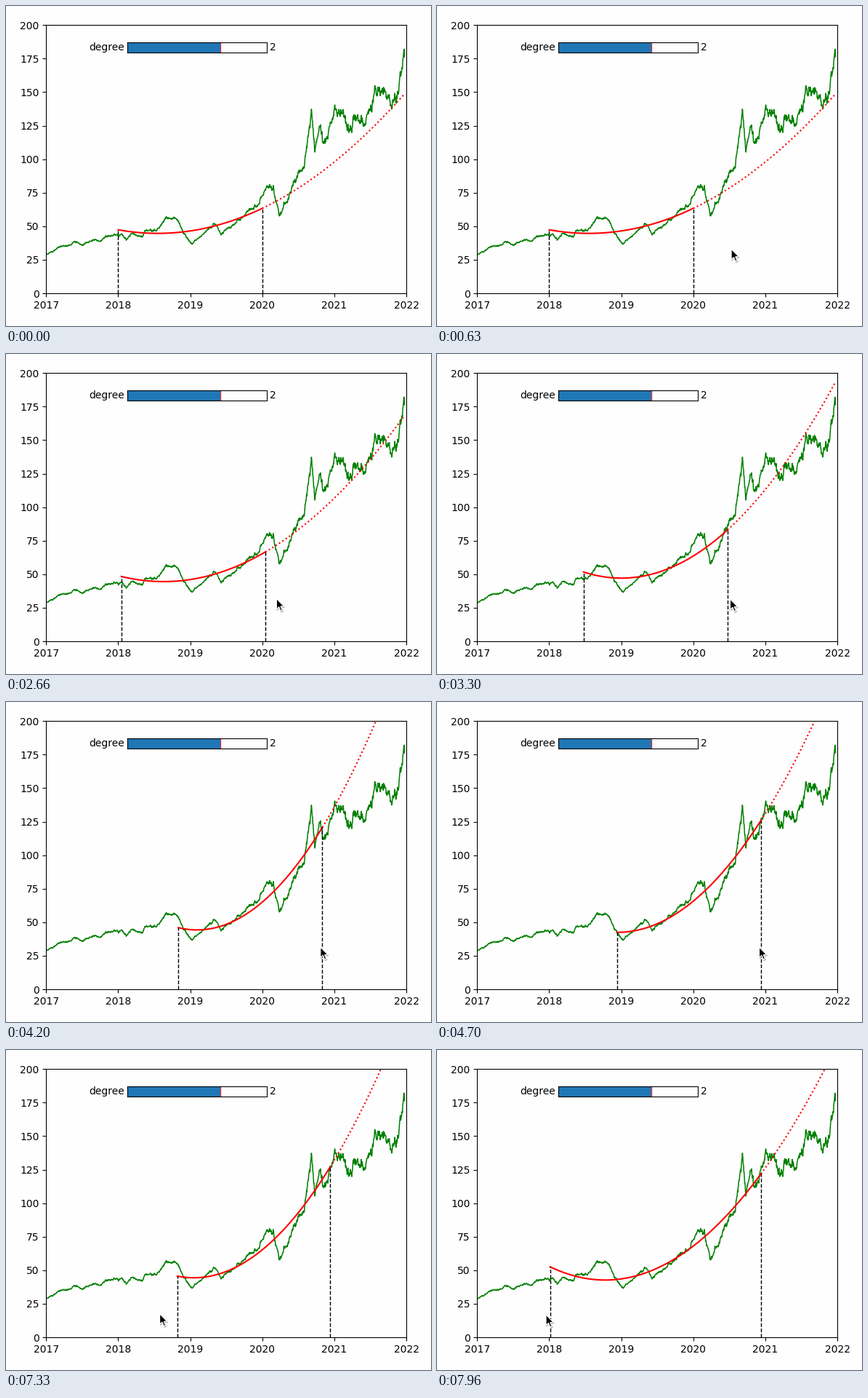
Write a matplotlib script that moves like this. It is 585 px wide and 440 px high and loops after 8 s.

```python
import numpy as np
import matplotlib.pyplot as plt
from matplotlib.animation import FuncAnimation
from matplotlib.patches import Polygon

W, H, DPI = 585, 440, 100
INTERVAL, LOOP = 40, 8000
START = 2017
PAPER = "#fefefe"

plt.rcParams.update({"font.family": "DejaVu Sans", "font.size": 10})

# Main turning points of the price: years after START, value
TURNS = [
    (.01, 29), (.17, 34.5), (.34, 36), (.4, 39), (.49, 36.2), (.68, 40.5),
    (.75, 38.5), (.86, 43.3), (1.05, 44), (1.11, 40), (1.19, 44.5),
    (1.33, 42), (1.38, 46.8), (1.54, 47.2), (1.66, 56), (1.78, 56.5),
    (1.84, 54), (1.91, 45), (2.02, 37), (2.15, 43.3), (2.34, 52),
    (2.43, 44.5), (2.6, 51), (2.85, 63), (2.95, 67), (3.06, 79), (3.15, 80),
    (3.235, 58), (3.45, 83), (3.59, 96), (3.683, 136), (3.73, 106),
    (3.79, 124), (3.85, 110), (4.005, 135), (4.08, 140), (4.2, 121),
    (4.305, 134), (4.4, 124), (4.55, 147), (4.695, 155), (4.775, 140),
    (4.89, 150), (4.972, 179),
]


def price_series():
    """Trend through the turning points with daily, quickly fading shocks."""
    t = np.linspace(TURNS[0][0], TURNS[-1][0], 1250)
    shocks = np.random.default_rng(7).normal(size=t.size)
    noise = np.convolve(shocks, .7 ** np.arange(20))[:t.size]
    volatility = np.where(t < 3.1, .008, .013)
    return t, np.interp(t, *zip(*TURNS)) * (1 + volatility * noise)


days, price = price_series()


def progress(t, begin, finish):
    return np.clip((t - begin) / (finish - begin), 0, 1)


def smooth(u):
    return u * u * (3 - 2 * u)


def ease_out(u, power=1.7):
    return 1 - (1 - u) ** power


def window(t):
    """Edges of the fitted span: first slid as a whole, then widened leftwards."""
    slide = (.648 * smooth(progress(t, 2460, 3730))
             + .292 * ease_out(progress(t, 3900, 4700), 2))
    widen = .927 * smooth(progress(t, 7160, 7960))
    return 1 + slide - widen, 2.998 + slide


# Pointer moves: begin, finish, x, y
ENTRY_TIME, ENTRY = 200, (581, 309)
MOVES = [
    (200, 730, 392, 336),
    (960, 1400, 354, 336),
    (2460, 3300, 403.5, 337),
    (3300, 3730, 418, 337),
    (3900, 4700, 443.5, 337),
    (5500, 5860, 255.5, 358.5),
    (6030, 6500, 245, 362),
    (7160, 7960, 150, 364),
]


def pointer(t):
    pos = np.array(ENTRY, float)
    for begin, finish, *goal in MOVES:
        pos += (goal - pos) * ease_out(progress(t, begin, finish))
    return pos


def add_axes(left, top, right, bottom, **kw):
    return fig.add_axes([left / W, 1 - bottom / H, (right - left) / W,
                         (bottom - top) / H], facecolor=PAPER, **kw)


fig = plt.figure(figsize=(W / DPI, H / DPI), dpi=DPI, facecolor=PAPER)

ax = add_axes(55.3, 26.3, 551.2, 395)
ax.set(xlim=(START, START + 5), ylim=(0, 200),
       xticks=range(START, START + 6), yticks=range(0, 201, 25))
ax.plot(START + days, price, color="green", lw=1.1)
solid, = ax.plot([], [], "r-", lw=1.5)
dotted, = ax.plot([], [], "r:", lw=1.5)
stems = [ax.plot([], [], "k--", lw=1)[0] for _ in range(2)]

slider = add_axes(167.3, 50.3, 359.3, 64.3)
slider.set(xlim=(0, 3), ylim=(0, 1), xticks=[], yticks=[])
slider.axvspan(0, 2, color="#1f77b4", lw=0)
slider.axvline(2, color="#d03050", lw=1)
for x, label, align in ((-.02, "degree", "right"), (1.02, "2", "left")):
    slider.text(x, .5, label, transform=slider.transAxes, ha=align, va="center")

overlay = add_axes(0, 0, W, H, zorder=10)
overlay.set(xlim=(0, W), ylim=(H, 0))
overlay.axis("off")
ARROW = np.array([(0, 0), (0, 14.5), (3.4, 11.4), (5.7, 17), (8.1, 16),
                  (5.8, 10.6), (10.3, 10.4)])
shadow = overlay.add_patch(Polygon(ARROW, fc="black", ec="black", lw=1.2, alpha=.2))
arrow = overlay.add_patch(Polygon(ARROW, fc="black", ec="white", lw=.9))


def update(frame):
    t = (frame + .5) * INTERVAL
    left, right = window(t)
    inside = (days >= left) & (days <= right)
    curve = np.poly1d(np.polyfit(days[inside] - left, price[inside], 2))

    for line, begin, finish in ((solid, left, right), (dotted, right, days[-1])):
        x = np.linspace(begin, finish, 120)
        line.set_data(START + x, curve(x - left))
    for stem, x in zip(stems, (left, right)):
        stem.set_data([START + x] * 2, [0, curve(x - left)])

    tip = pointer(t)
    for patch, offset in ((arrow, (0, 0)), (shadow, (.8, 1.3))):
        patch.set_xy(ARROW + tip + offset)
        patch.set_visible(t >= ENTRY_TIME)
    return solid, dotted, *stems, shadow, arrow


anim = FuncAnimation(fig, update, frames=LOOP // INTERVAL, interval=INTERVAL,
                     repeat=True, repeat_delay=0, blit=False)
plt.show()
```
